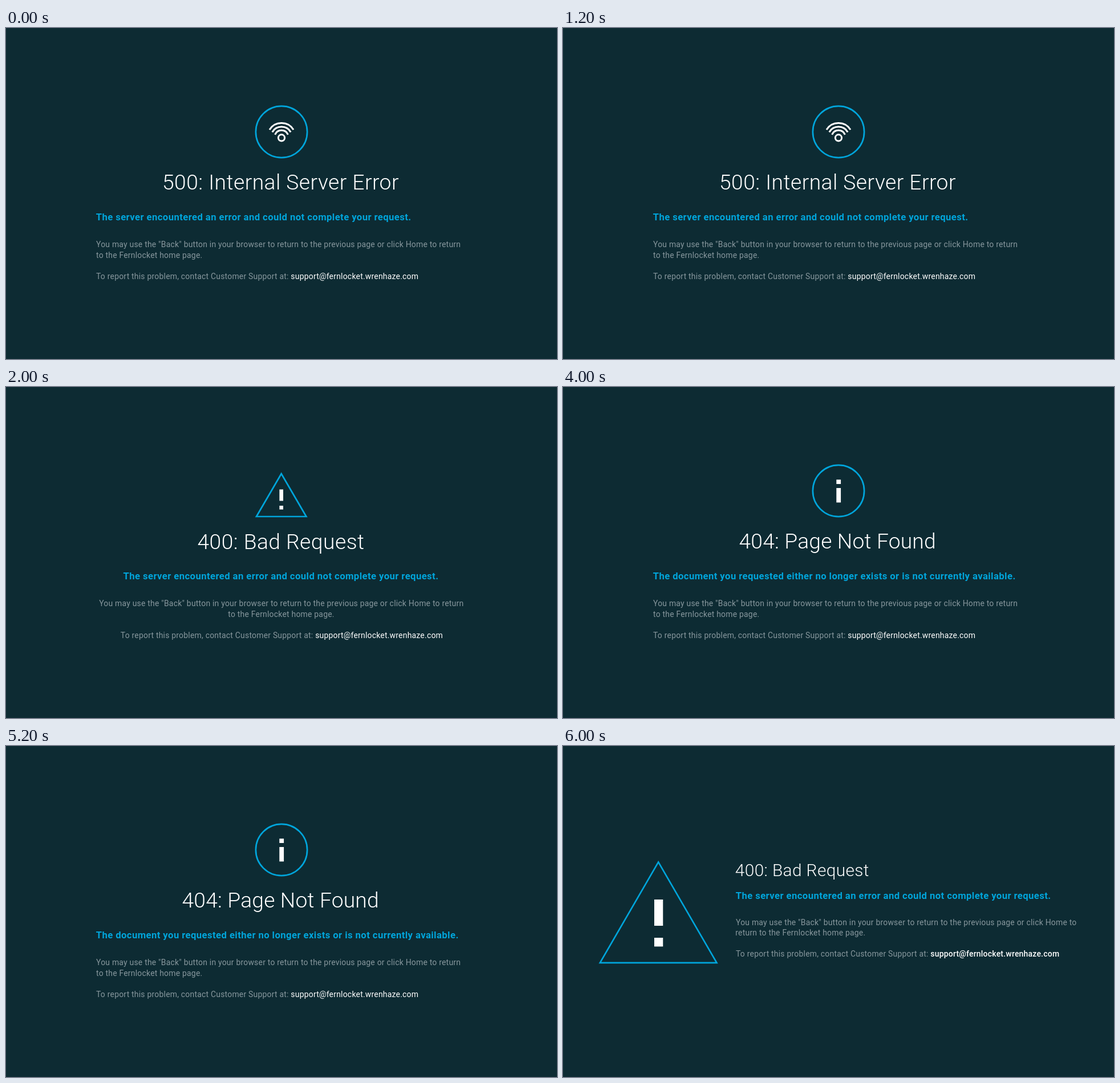
An HTML page for the animation above (8 s loop, 966 by 580 pixels).

```html
<!DOCTYPE html>
<html lang="en">
<head>
<meta charset="utf-8">
<title>Error pages</title>
<style>
  html, body { margin: 0; width: 100%; height: 100%; overflow: hidden; background: #0d2b33; }
  svg { display: block; width: 966px; height: 580px; }
  text { font-family: Roboto, "Liberation Sans", sans-serif; white-space: pre; }
  .title { font-weight: 300; fill: #fff; }
  .lead { font-size: 16.7px; font-weight: 700; letter-spacing: .41px; fill: #00a5db; }
  .body { font-size: 13.95px; letter-spacing: .22px; fill: #87979d; }
  .mail { fill: #fff; }
  .strong { font-weight: 500; }
  .line { fill: none; stroke: #00a5db; stroke-width: 2.7; }
  .wave { fill: none; stroke: #fff; stroke-width: 3; }
  .solid { fill: #fff; }
</style>
</head>
<body>
<svg id="stage" viewBox="0 0 966 580"></svg>
<script>
const HOLD = 2000;
const stage = document.getElementById('stage');

const ring = '<circle class="line" cx="483" cy="182" r="45.1"/>';
const bar = (x, y, w, h) => `<rect class="solid" x="${x}" y="${y}" width="${w}" height="${h}"/>`;
const triangle = (x, top, half, base) =>
  `<path class="line" d="M${x} ${top}L${x + half} ${base}H${x - half}Z"/>`;
const wave = (y, half, r) =>
  `<path class="wave" d="M${483 - half} ${y}A${r} ${r} 0 0 1 ${483 + half} ${y}"/>`;

const smallWarning = triangle(482.7, 152, 43.7, 227) +
  bar(479.4, 179.5, 6.6, 20) + bar(479.4, 208, 6.6, 6.6);
const largeWarning = triangle(167.2, 203.4, 102.3, 379.9) +
  bar(160, 269, 15.3, 46) + bar(160, 336, 15.3, 15.4);
const info = ring + bar(479.3, 162.3, 7.8, 7.7) + bar(479.3, 177, 7.8, 25.4);
const signal = ring + wave(178.2, 21, 24.8) + wave(182.4, 16.2, 18.6) + wave(186.8, 11.4, 12.4) +
  '<circle class="wave" cx="483" cy="192.4" r="5.6"/>';

const failed = 'The server encountered an error and could not complete your request.';
const missing = 'The document you requested either no longer exists or is not currently available.';
const advice = 'You may use the "Back" button in your browser to return to the previous page or click Home to';
const wide = [advice + ' return', 'to the Fernlocket home page.'];
const narrow = [advice, 'return to the Fernlocket home page.'];

// title: [text, x, baseline, size, spacing]; lead: [text, x, baseline]
// body: x of each of the three lines, top: first body baseline
const pages = [
  { icon: signal, title: ['500: Internal Server Error', 274, 283, 37.2, .48],
    lead: [failed, 157.7, 337], lines: wide, body: [158, 158, 158], top: 384 },
  { icon: smallWarning, title: ['400: Bad Request', 335.5, 284, 37.2, .48],
    lead: [failed, 205.5, 337], lines: wide, body: [163.2, 389.3, 200.8], top: 384 },
  { icon: info, title: ['404: Page Not Found', 308.5, 283, 37.2, .2],
    lead: [missing, 157.7, 337], lines: wide, body: [158, 158, 158], top: 384 },
  { icon: largeWarning, title: ['400: Bad Request', 301.8, 228, 29.8, .4],
    lead: [failed, 302.7, 268], lines: narrow, body: [303, 302.3, 303], top: 313.5, strong: true }
];

const text = (kind, str, x, y, extra = '') =>
  `<text class="${kind}" x="${x}" y="${y}" ${extra}>${str}</text>`;

function render({ icon, title, lead, lines, body, top, strong }) {
  const [str, x, y, size, gap] = title;
  const contact = 'To report this problem, contact Customer Support at: ' +
    `<tspan class="mail${strong ? ' strong' : ''}">support@fernlocket.wrenhaze.com</tspan>`;
  return icon +
    text('title', str, x, y, `style="font-size:${size}px;letter-spacing:${gap}px"`) +
    text('lead', ...lead) +
    text('body', lines[0], body[0], top) +
    text('body', lines[1], body[1], top + 18.6) +
    text('body', contact, body[2], top + 55.9);
}

stage.innerHTML = pages.map(p => `<g>${render(p)}</g>`).join('');

const count = pages.length;
[...stage.children].forEach((page, i) => page.animate([
  { opacity: 1, offset: 0, easing: 'step-end' },
  { opacity: 0, offset: 1 / count, easing: 'step-end' },
  { opacity: 0, offset: 1 }
], { duration: HOLD * count, iterations: Infinity, iterationStart: (count - i) % count / count }));
</script>
</body>
</html>
```
